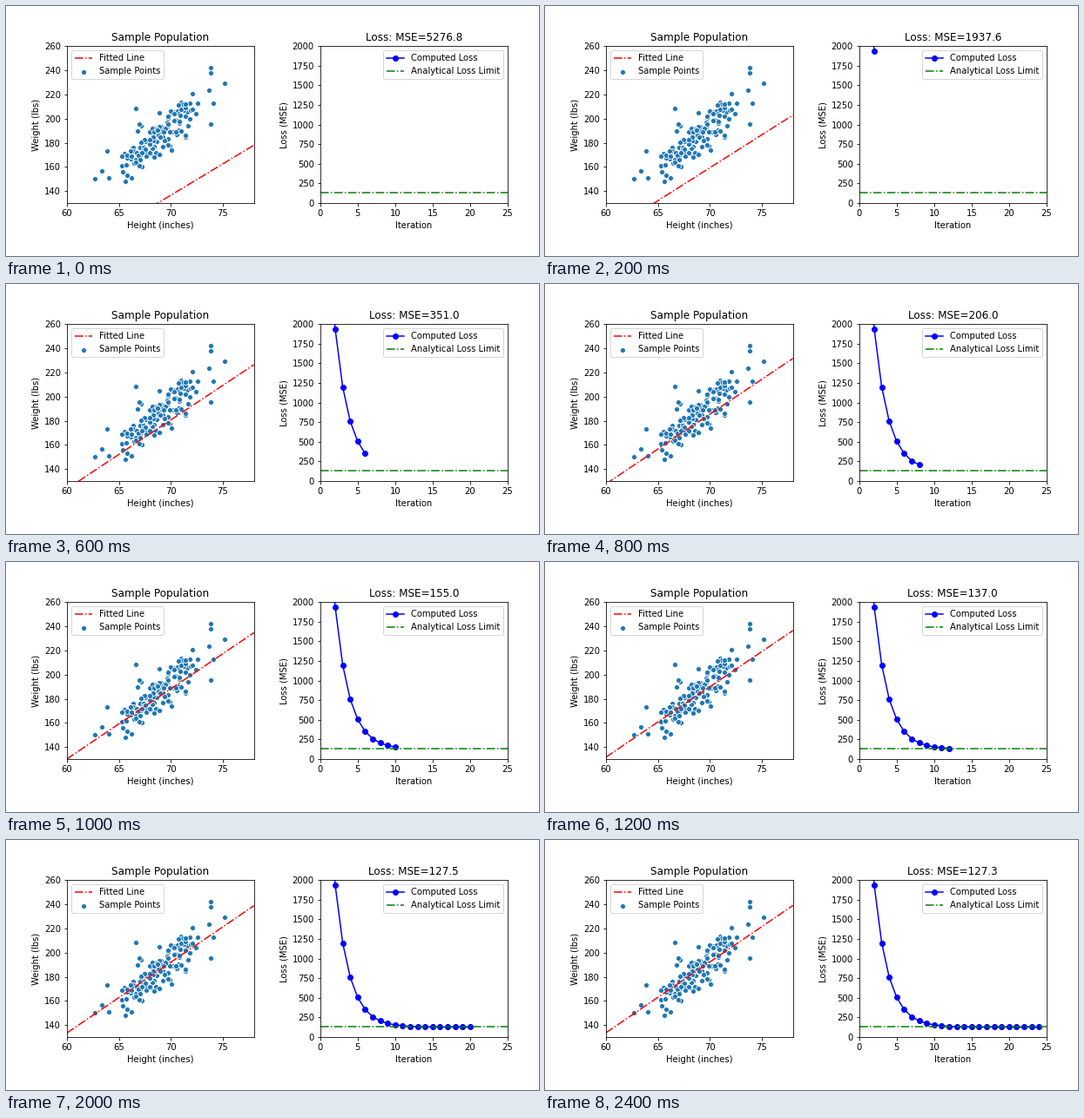
These frames come from a looping animation (612 px wide and 288 px high, 2.5 s). A matplotlib script:

```python
import matplotlib.pyplot as plt
import numpy as np
from matplotlib.animation import FuncAnimation

W, H, DPI = 612, 288, 72
STEPS, INTERVAL = 25, 100
LIMIT, START_LOSS = 127.31, 5276.8
LOSS_DECAY = 0.592912
PARAM_DECAY = LOSS_DECAY ** 0.5  # squared error shrinks twice as fast

plt.rcParams["font.family"] = "DejaVu Sans"


def best_fit(x):
    return 133.6 + 5.87 * (x - 60)


def fitted(x, step):
    gap = 49 + 0.68 * (x - 60)
    return best_fit(x) - gap * PARAM_DECAY ** step


def sample_points():
    """Random cloud around the best fit, plus the few far-out samples."""
    rng = np.random.default_rng(7)
    x = 64.6 + 8.4 * rng.beta(2, 2, 135)
    noise = np.clip(rng.normal(0, 9.5, x.size), -19, 21)
    cloud = np.column_stack([x, best_fit(x) + noise])
    extremes = [(62.7, 150), (63.4, 156.6), (64, 151), (63.9, 173),
                (66.6, 208.5), (73.8, 242), (73.8, 238), (73.7, 223.5),
                (75.2, 229.3), (74.1, 213), (73.8, 195.5)]
    return np.vstack([cloud, extremes])


def add_panel(left, title, xlabel, ylabel, xlim, ylim):
    ax = fig.add_axes([left / W, 61 / H, 215 / W, 180.7 / H])
    ax.set(xlabel=xlabel, ylabel=ylabel, xlim=xlim, ylim=ylim)
    ax.set_title(title)
    return ax


fig = plt.figure(figsize=(W / DPI, H / DPI), dpi=DPI, facecolor="white")

pop = add_panel(69.8, "Sample Population", "Height (inches)", "Weight (lbs)",
                (60, 78), (130, 260))
pop.set_xticks(range(60, 78, 5))
pop.set_yticks(range(140, 261, 20))
points = pop.scatter(*sample_points().T, s=36, color="C0", edgecolors="white",
                     linewidths=0.8, label="Sample Points")
span = np.array([60, 78])
fit_line, = pop.plot(span, fitted(span, 0), "r-.", label="Fitted Line")
pop.legend(handles=[fit_line, points], loc="upper left")

loss_ax = add_panel(360.8, "", "Iteration", "Loss (MSE)", (0, 25), (0, 2000))
loss_ax.set_xticks(range(0, 26, 5))
loss_ax.set_yticks(range(0, 2001, 250))
loss_line, = loss_ax.plot([], [], "bo-", label="Computed Loss")
loss_ax.plot([0, 25], [LIMIT, LIMIT], "g-.", label="Analytical Loss Limit")
loss_ax.legend(loc="upper right")

steps = np.arange(STEPS)
losses = LIMIT + (START_LOSS - LIMIT) * LOSS_DECAY ** steps


def update(step):
    fit_line.set_ydata(fitted(span, step))
    loss_line.set_data(steps[:step + 1], losses[:step + 1])
    loss_ax.set_title(f"Loss: MSE={losses[step]:.1f}")
    return fit_line, loss_line


anim = FuncAnimation(fig, update, frames=STEPS, interval=INTERVAL,
                     repeat=True, repeat_delay=0, blit=False)
plt.show()
```
